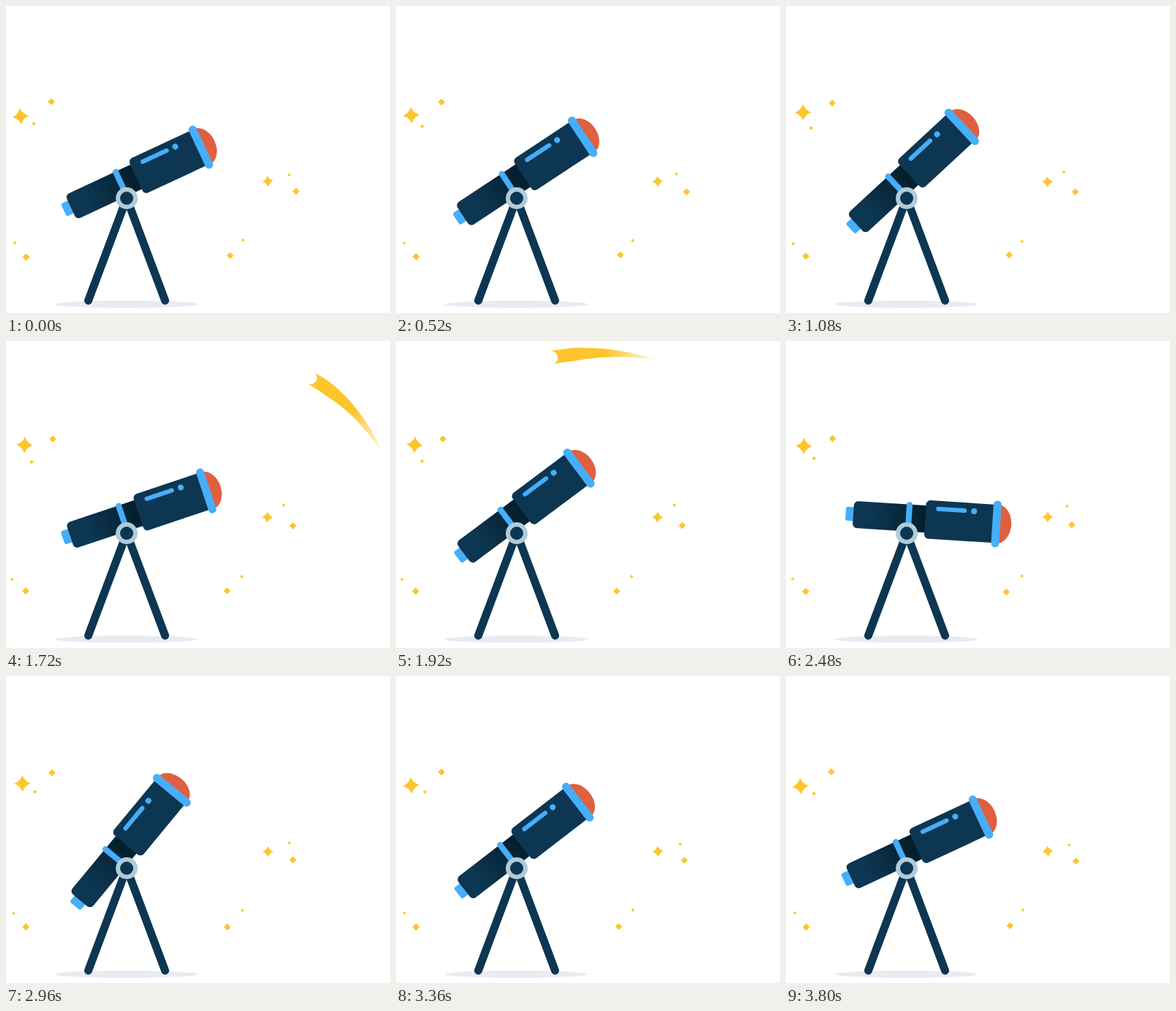
An HTML page that plays this animation: 525 px wide and 420 px high, repeating every 3840 ms.

```html
<!DOCTYPE html>
<html lang="en">
<head>
<meta charset="utf-8">
<title>Telescope</title>
<style>
  html, body { margin: 0; width: 100%; height: 100%; overflow: hidden; background: #fff; }
  svg { display: block; }
  .navy { fill: #0d3652; }
  .blue { fill: #47aef9; }
  .line { fill: none; stroke: #47aef9; stroke-linecap: round; }
  #stars { fill: #fdc52c; stroke: #fdc52c; stroke-linejoin: round; }
</style>
</head>
<body>
<svg width="525" height="420" viewBox="0 0 525 420">
  <defs>
    <linearGradient id="tube" gradientUnits="userSpaceOnUse" x1="-50" y1="0" x2="18" y2="0">
      <stop offset="0" stop-color="#0d3652"/>
      <stop offset="1" stop-color="#04202f"/>
    </linearGradient>
    <linearGradient id="fade" gradientUnits="userSpaceOnUse">
      <stop stop-color="#fdc52c"/>
      <stop stop-color="#fdc52c"/>
      <stop stop-color="#fdc52c"/>
    </linearGradient>
    <path id="track" d="M522 170C462 30 310-15 155 38"/>
  </defs>
  <path id="comet" fill="url(#fade)"/>
  <g id="stars"></g>
  <ellipse cx="164.5" cy="408" rx="97.5" ry="5" fill="#e8ebf2"/>
  <path d="M112.5 403L165 263L217.5 403" fill="none" stroke="#0d3652" stroke-width="11" stroke-linecap="round"/>
  <g id="scope">
    <rect class="blue" x="-85" y="-31" width="16" height="19" rx="3"/>
    <rect x="-74.5" y="-39.5" width="104" height="37" rx="6" fill="url(#tube)"/>
    <path class="line" d="M1.5-39V-6" stroke-width="8"/>
    <ellipse cx="123" cy="-20.5" rx="19" ry="26.5" fill="#e05f3e"/>
    <rect class="navy" x="24" y="-47" width="99" height="52.5" rx="6"/>
    <path class="line" d="M121.5-47V6" stroke-width="11"/>
    <path class="line" d="M41-36H77" stroke-width="6"/>
    <circle class="blue" cx="90" cy="-36" r="4"/>
  </g>
  <circle class="navy" cx="165" cy="263" r="12" stroke="#b0cbd9" stroke-width="6"/>
</svg>
<script>
const LOOP = 3840;
const $ = id => document.getElementById(id);
const clamp = (v, lo, hi) => Math.min(hi, Math.max(lo, v));
const wave = (theta, phase) => Math.cos(theta - phase * Math.PI / 180);

// Tilt of the tube: [time, degrees], eased between entries
const tilt = [[0, -25], [1080, -42.8], [1720, -18.5], [2120, -54.7],
              [2480, 3.7], [2960, -50.4], [3760, -25], [LOOP, -25]];

function tiltAt(t) {
  const i = tilt.findIndex(k => k[0] > t);
  const [t0, a] = tilt[i - 1], [t1, b] = tilt[i];
  return a + (b - a) * (1 - Math.cos(Math.PI * (t - t0) / (t1 - t0))) / 2;
}

// Drift: size, then centre, amplitude and phase for x and y
const stars = [
  { star: 1, r: 11, x: [22.8, 2.8, 0], y: [146.5, 4.5, 0], x1: -1 },
  { star: 1, r: 7.3, x: [357.8, 0.3, -50], y: [240.4, -0.7, 0] },
  { r: 4.5, x: [63, -1, 0], y: [132.5, -1.5, 0] },
  { r: 2.7, x: [36.9, -2.7, 114], y: [162.7, 4.3, 114] },
  { r: 2.3, x: [383.8, -4.7, 135], y: [227.8, 3.3, -3] },
  { r: 4.5, x: [394, -3.4, 220], y: [252.9, -1.5, 250] },
  { r: 4.5, x: [304, -2.9, 215], y: [341.9, 1.6, 257] },
  { r: 2.3, x: [323.1, 0.9, -10], y: [321.3, 1.05, 155] },
  { r: 2.3, x: [10.1, 1.9, 0], y: [325, -1, 0] },
  { r: 4.7, x: [27.2, 0.3, 0], y: [342.8, 0.75, -30] }
];

for (const s of stars) {
  // The outline is drawn slightly inside r, its stroke rounds the corners
  const soft = s.star ? 0.5 : s.r * 0.3;
  const r = s.r - soft / 2, c = r * 0.27;
  s.el = document.createElementNS("http://www.w3.org/2000/svg", "path");
  s.el.setAttribute("d", s.star
    ? `M0 ${-r}Q${c} ${-c} ${r} 0Q${c} ${c} 0 ${r}Q${-c} ${c} ${-r} 0Q${-c} ${-c} 0 ${-r}Z`
    : `M0 ${-r}L${r} 0L0 ${r}L${-r} 0Z`);
  s.el.setAttribute("stroke-width", soft);
  $("stars").append(s.el);
}

function drawStars(theta) {
  for (const s of stars) {
    const [x, y] = [s.x, s.y].map(([mid, amp, phase]) => mid + amp * wave(theta, phase));
    // x of the large star falls back at the loop's ends, so its sign flips
    const px = s.x1 ? 2 * s.x[0] - x : x;
    const py = y;
    const turn = s.star ? -1 - 4 * Math.cos(theta) : 0;
    s.el.setAttribute("transform", `translate(${px} ${py}) rotate(${turn})`);
  }
}

const comet = { start: 1566, speed: 1.05, tail: 150, width: 9, steps: 24 };
const track = $("track"), trackLen = track.getTotalLength();
const stops = [...$("fade").children];

function drawComet(t) {
  const head = (t - comet.start) * comet.speed;
  const back = head - comet.tail;
  const from = clamp(back, 0, trackLen), to = clamp(head, 0, trackLen);
  if (to - from < 0.5) return $("comet").setAttribute("d", "");

  const left = [], right = [];
  let w;
  for (let i = 0; i <= comet.steps; i++) {
    const d = from + (to - from) * i / comet.steps;
    const p = track.getPointAtLength(d);
    const a = track.getPointAtLength(d - 1), b = track.getPointAtLength(d + 1);
    const len = Math.hypot(b.x - a.x, b.y - a.y);
    w = comet.width * Math.min(1, 1.25 * (d - back) / comet.tail);
    const nx = (b.y - a.y) / len * w, ny = (a.x - b.x) / len * w;
    left.push(`${p.x + nx} ${p.y + ny}`);
    right.unshift(`${p.x - nx} ${p.y - ny}`);
  }
  $("comet").setAttribute("d",
    `M${left.join("L")}A${w} ${w} 0 0 0 ${right[0]}L${right.join("L")}Z`);

  const u0 = (from - back) / comet.tail, u1 = (to - back) / comet.tail;
  const mid = clamp(0.5, u0, u1);
  [u0, mid, u1].forEach((u, i) => {
    stops[i].setAttribute("offset", (u - u0) / (u1 - u0));
    stops[i].setAttribute("stop-opacity", Math.min(1, 2 * u));
  });
  const p = track.getPointAtLength(from), q = track.getPointAtLength(to);
  const ends = { x1: p.x, y1: p.y, x2: q.x, y2: q.y };
  for (const k in ends) $("fade").setAttribute(k, ends[k]);
}

function draw() {
  const t = performance.now() % LOOP;
  $("scope").setAttribute("transform", `translate(165 263) rotate(${tiltAt(t)})`);
  drawStars(2 * Math.PI * t / LOOP);
  drawComet(t);
  requestAnimationFrame(draw);
}
draw();
</script>
</body>
</html>
```
